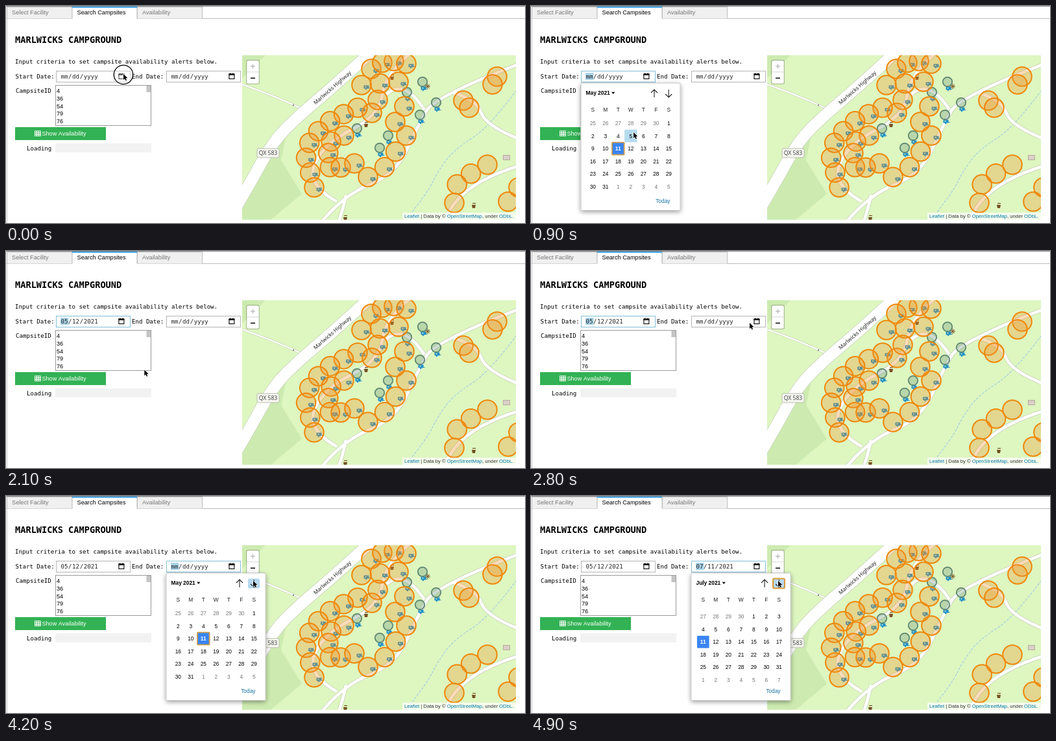
These frames come from a looping animation (800 px wide and 335 px high, 5000 ms). An HTML page with a canvas:

```html
<!DOCTYPE html>
<html lang="en">
<head>
<meta charset="utf-8">
<title>Campsite search</title>
<style>
html, body { margin: 0; width: 100%; height: 100%; overflow: hidden; background: #fff; }
canvas { display: block; width: 800px; height: 335px; }
</style>
</head>
<body>
<canvas id="stage" width="800" height="335"></canvas>
<script>
const ctx = document.getElementById('stage').getContext('2d');
const LOOP = 5000, STEP = 100;
const SANS = '"Liberation Sans", Arial, sans-serif';
const MONO = '"DejaVu Sans Mono", monospace';
const NOTO = '"Noto Sans", sans-serif';
const MONTHS = { 4: 'May', 5: 'June', 6: 'July' };
const GRASS = '#cdebb0', CAMP = '#def6c0';

function rect(x, y, w, h, fill, stroke, lw = 1) {
  if (fill) { ctx.fillStyle = fill; ctx.fillRect(x, y, w, h); }
  if (stroke) {
    ctx.strokeStyle = stroke;
    ctx.lineWidth = lw;
    ctx.strokeRect(x + lw / 2, y + lw / 2, w - lw, h - lw);
  }
}

function paint(fill, stroke, lw = 1) {
  if (fill) { ctx.fillStyle = fill; ctx.fill(); }
  if (stroke) { ctx.strokeStyle = stroke; ctx.lineWidth = lw; ctx.stroke(); }
}

function round(x, y, w, h, r, fill, stroke, lw) {
  ctx.beginPath();
  ctx.roundRect(x, y, w, h, r);
  paint(fill, stroke, lw);
}

function disc(x, y, r, fill, stroke, lw) {
  ctx.beginPath();
  ctx.arc(x, y, r, 0, Math.PI * 2);
  paint(fill, stroke, lw);
}

function poly(pts, fill, stroke, lw) {
  ctx.beginPath();
  pts.forEach(p => ctx.lineTo(...p));
  ctx.closePath();
  paint(fill, stroke, lw);
}

function text(str, x, y, font, color = '#000', align = 'left') {
  ctx.font = font;
  ctx.fillStyle = color;
  ctx.textAlign = align;
  ctx.fillText(str, x, y);
}

// Smooth line through the midpoints of the given points.
function path(pts, color, lw, dash = []) {
  ctx.beginPath();
  ctx.moveTo(...pts[0]);
  for (let i = 1; i < pts.length - 1; i++) {
    const [x, y] = pts[i], [nx, ny] = pts[i + 1];
    const k = i === pts.length - 2 ? 1 : 0.5;
    ctx.quadraticCurveTo(x, y, x + (nx - x) * k, y + (ny - y) * k);
  }
  ctx.setLineDash(dash);
  paint(null, color, lw);
  ctx.setLineDash([]);
}

// n evenly spaced points along a polyline.
function spread(n, ...pts) {
  const lens = pts.slice(1).map((p, i) => Math.hypot(p[0] - pts[i][0], p[1] - pts[i][1]));
  const gap = lens.reduce((a, b) => a + b, 0) / (n - 1);
  return Array.from({ length: n }, (_, k) => {
    let s = gap * k, i = 0;
    while (i < lens.length - 1 && s > lens[i]) s -= lens[i++];
    const u = s / lens[i], [x, y] = pts[i], [nx, ny] = pts[i + 1];
    return [x + (nx - x) * u, y + (ny - y) * u];
  });
}

const campSites = [
  ...spread(4, [563, 97], [588, 83], [617, 89]),
  ...spread(3, [548, 122], [605, 117]),
  ...spread(2, [573, 145], [564, 165]),
  ...spread(8, [542, 157], [503, 175], [470, 203], [462, 232], [475, 280]),
  ...spread(6, [521, 200], [495, 212], [500, 254], [537, 243]),
  ...spread(4, [558, 264], [585, 248], [617, 200]),
  ...spread(2, [600, 179], [614, 155])
];
const eastSites = [
  ...spread(2, [757, 109], [750, 121]),
  ...spread(2, [705, 146], [714, 157]),
  ...spread(4, [742, 245], [696, 270], [691, 304]),
  ...spread(2, [774, 302], [790, 280])
];
const closedSites = [
  [541, 189],
  ...spread(2, [642, 117], [618, 133]),
  ...spread(2, [663, 149], [638, 168]),
  ...spread(2, [589, 200], [576, 219])
];

function drawRoads() {
  const highway = [[340, 335], [374, 278], [412, 208], [455, 166], [503, 126], [562, 72]];
  const lanes = [
    [[484, 336], [520, 292], [600, 260], [635, 185], [660, 140], [790, 90]],
    [[510, 302], [462, 275], [490, 212], [575, 170], [585, 105], [622, 74]],
    [[585, 138], [612, 110], [645, 160]],
    [[512, 336], [520, 312], [524, 292]],
    [[676, 336], [690, 278], [790, 247]],
    [[690, 134], [725, 145], [740, 185], [790, 205]]
  ];
  const spur = [[364, 121], [410, 137], [453, 157]];
  path(spur, '#bfc8b0', 3.4);
  path(spur, '#fff', 2.2);
  path(highway, '#bfc8b0', 19);
  lanes.forEach(l => path(l, '#bfc8b0', 6));
  lanes.forEach(l => path(l, '#fff', 4.8));
  path(highway, '#fff', 17.8);
  disc(443, 153, 1.2, '#888');
}

function drawVan(x, y) {
  const blue = '#1e8fc6';
  round(x - 4.5, y - 3.5, 8, 5, 1, blue);
  rect(x - 2.5, y - 2, 2, 1.5, CAMP);
  rect(x + 3, y, 2.5, 1, blue);
  disc(x - 1, y + 2, 1.2, blue);
}

function drawTap(x, y) {
  rect(x - 2, y - 4, 5, 1.2, '#765024');
  poly([[x - 3, y - 1], [x + 3, y - 1], [x + 2, y + 4], [x - 2, y + 4]], '#765024');
}

function drawSpark(x, y) {
  for (let a = 0; a < Math.PI; a += Math.PI / 4) {
    const dx = 4 * Math.cos(a), dy = 4 * Math.sin(a);
    path([[x - dx, y - dy], [x, y], [x + dx, y + dy]], '#765024', 1);
  }
}

function drawZoom() {
  round(370, 83, 21, 38, 3, 'rgba(0,0,0,.22)');
  round(371.3, 84.3, 18.4, 35.4, 2, '#fff');
  rect(371.3, 101.5, 18.4, 0.8, '#ccc');
  rect(377, 92.4, 7, 1.4, '#bbb');
  rect(379.8, 89.6, 1.4, 7, '#bbb');
  rect(377, 110.6, 7, 1.5, '#000');
}

function drawCredit() {
  rect(611, 319, 175, 11, 'rgba(255,255,255,.7)');
  let x = 614;
  ['Leaflet', ' | Data by © ', 'OpenStreetMap', ', under ', 'ODbL.'].forEach((s, i) => {
    text(s, x, 327.2, '7.7px ' + SANS, i % 2 ? '#333' : '#0078a8');
    x += ctx.measureText(s).width;
  });
}

function drawMap() {
  ctx.save();
  ctx.beginPath();
  ctx.rect(364, 76, 422, 254);
  ctx.clip();
  rect(364, 76, 422, 254, CAMP);
  poly([[364, 76], [400, 76], [364, 112]], GRASS);
  poly([[432, 200], [424, 238], [456, 290], [408, 330], [364, 330], [364, 300]], GRASS);
  path([[787, 130], [744, 188], [690, 222], [664, 258], [650, 288], [615, 332]],
    '#a3cfe0', 1.2, [4, 2]);
  drawRoads();
  rect(766, 230, 11, 8, '#d9d0c9', '#b9ab9c');

  ctx.save();
  ctx.translate(503, 126);
  ctx.rotate(-0.72);
  text('Marlwicks Highway', 0, 3, '8.2px ' + NOTO, '#222', 'center');
  ctx.restore();
  round(387, 220, 34, 14, 2, '#f6f6f1', '#b9bcae');
  text('QX 583', 404, 230.2, '8.6px ' + NOTO, '#444', 'center');

  campSites.forEach(([x, y]) => drawVan(x + 8, y + 4));
  closedSites.forEach(([x, y]) => drawVan(x + 2, y + 11));
  [[555, 183], [595, 110], [721, 308], [523, 327]].forEach(p => drawTap(...p));
  drawSpark(650, 124);
  closedSites.forEach(([x, y]) => disc(x, y, 7.2, 'rgba(95,140,115,.3)', '#5e8770', 1.8));
  [...campSites, ...eastSites]
    .forEach(([x, y]) => disc(x, y, 14.8, 'rgba(240,145,40,.32)', '#ef8708', 2));
  drawZoom();
  drawCredit();
  ctx.restore();
}

function drawDate(left, parts, focus) {
  rect(left, 100, 115, 18, '#fff', focus ? '#7fbfd8' : '#b5b5b5');
  if (focus) rect(left + 7, 103, 12.5, 11, '#a9d5ea');
  let x = left + 7.5;
  parts.split(/(\/)/).forEach(s => {
    text(s, x, 112.3, '9.1px ' + MONO, '#222');
    x += ctx.measureText(s).width + 0.6;
  });
  rect(left + 96.4, 104.6, 9, 8.4, null, '#000', 1.1);
  rect(left + 96.4, 104.6, 9, 2.2, '#000');
  for (const dx of [98, 102.5]) rect(left + dx, 103.4, 1.2, 2, '#000');
}

function drawTabs() {
  rect(0, 0, 800, 1, '#8d8d8d');
  rect(0, 19, 800, 1, '#bdbdbd');
  rect(1, 19, 1, 316, '#c8c8c8');
  ['Select Facility', 'Search Campsites', 'Availability'].forEach((s, i) => {
    const x = 1 + i * 100.5, active = i === 1;
    rect(x, 1, 101, active ? 19 : 18.5, active ? '#fff' : '#f0f0f0');
    for (const dx of [0, 100]) rect(x + dx, 1, 1, 18.5, '#bdbdbd');
    rect(x, 1, 101, active ? 1.6 : 1, active ? '#2196e8' : '#bdbdbd');
    text(s, x + 8, 13.3, '9.2px ' + SANS, active ? '#000' : '#777');
  });
}

function drawForm() {
  const mono = '9.1px ' + MONO, sans = '9.1px ' + SANS;
  text('MARLWICKS CAMPGROUND', 14, 56.5, 'bold 13.65px ' + MONO);
  text('Input criteria to set campsite availability alerts below.', 14, 89, mono);
  text('Start Date:', 14.5, 111.5, mono);
  text('End Date:', 194, 111.5, mono);
  text('CampsiteID', 15, 133.5, mono);
  text('Loading', 32, 222.5, mono);

  rect(76, 122, 148, 63, '#fff', '#9a9a9a');
  [4, 36, 54, 79, 76].forEach((n, i) => text(n, 78, 134.3 + i * 11.65, sans));
  rect(216.5, 123, 6.5, 10, '#c4c4c4');
  rect(14, 187, 140, 20, '#32b254');
  for (let i = 0; i < 9; i++) {
    rect(44 + (i % 3) * 3, 192.5 + Math.floor(i / 3) * 2.6, 3.8, 3.4, null, '#fff', 0.9);
  }
  text('Show Availability', 55.5, 200, sans, '#fff');
  rect(76, 212, 148, 14, '#f2f2f2');
}

function drawArrow(x, y, dir) {
  ctx.beginPath();
  ctx.moveTo(x, y - 6 * dir);
  ctx.lineTo(x, y + 6 * dir);
  ctx.moveTo(x - 5, y + dir);
  ctx.lineTo(x, y + 6 * dir);
  ctx.lineTo(x + 5, y + dir);
  paint(null, '#222', 1.1);
}

// Scroll is measured in weeks from 25 April; button is '', 'hover' or 'focus'.
function drawPicker(left, month, scroll, mouse, button) {
  const font = '8.4px ' + SANS, title = MONTHS[month] + ' 2021';
  ctx.save();
  ctx.shadowColor = 'rgba(0,0,0,.4)';
  ctx.shadowBlur = 7;
  ctx.shadowOffsetY = 2;
  round(left, 119, 154, 197, 2, '#fff');
  ctx.restore();
  round(left + 0.5, 119, 153, 196.5, 2, null, '#bbb', 0.8);

  text(title, left + 8, 137.2, 'bold ' + font);
  const tip = left + 13 + ctx.measureText(title).width;
  poly([[tip - 2.6, 132.8], [tip + 2.6, 132.8], [tip, 136]], '#000');
  if (button) {
    round(left + 126.5, 127.5, 18, 15, 2, '#b5d9ee', button === 'focus' && '#dd9a35', 2);
  }
  drawArrow(left + 113.5, 135, -1);
  drawArrow(left + 135.7, 135, 1);
  const colX = c => left + 18.8 + c * 19.5;
  [...'SMTWTFS'].forEach((d, c) => text(d, colX(c), 163, font, '#222', 'center'));

  ctx.save();
  ctx.beginPath();
  ctx.rect(left, 170, 154, 119);
  ctx.clip();
  for (let r = Math.floor(scroll); r < scroll + 6; r++) {
    const y = 181 + 19.6 * (r - scroll);
    for (let c = 0; c < 7; c++) {
      const x = colX(c), day = new Date(2021, 3, 25 + r * 7 + c);
      const inMonth = day.getMonth() === month;
      const picked = inMonth && day.getDate() === 11;
      const hover = Math.abs(mouse[0] - x) < 9.7 && Math.abs(mouse[1] - y) < 9.8;
      if (picked) {
        round(x - 9.3, y - 9.5, 18.6, 19, 1, '#3a85f3', button !== 'focus' && '#cf9c48', 1.8);
      } else if (hover) {
        rect(x - 9.7, y - 9.7, 19.4, 19.4, '#b5dbee');
      }
      text(day.getDate(), x, y + 3, (picked ? 'bold ' : '') + font,
        picked ? '#fff' : inMonth ? '#000' : '#777', 'center');
    }
  }
  ctx.restore();
  text('Today', left + 138, 303.5, font, '#16739e', 'right');
}

// Pointer moves: start, end, target position.
const MOVES = [
  [300, 900, 158, 195], [900, 1400, 156, 217], [1800, 2600, 337, 111],
  [3000, 3300, 348, 110], [3700, 4200, 381, 131]
];

function mouseAt(t) {
  return MOVES.reduce(([x, y], [from, to, tx, ty]) => {
    const u = Math.min(1, Math.max(0, (t - from) / (to - from)));
    const e = u * u * (3 - 2 * u);
    return [x + (tx - x) * e, y + (ty - y) * e];
  }, [181, 105]);
}

function drawCursor([x, y], pressed) {
  if (pressed) disc(x, y + 1, 14.7, 'rgba(255,255,255,.3)', '#000', 1.3);
  ctx.save();
  ctx.translate(x, y);
  ctx.scale(0.86, 0.86);
  ctx.lineJoin = 'round';
  const shape = [[0, 0], [0, 10.5], [2.4, 8.3], [4, 12], [5.8, 11.2], [4.2, 7.6], [7.4, 7.4]];
  poly(shape, null, '#fff', 1.6);
  poly(shape, '#000');
  ctx.restore();
}

const between = (t, a, b) => t >= a && t < b;
const easeOut = (t, start) => 1 - (1 - Math.min(1, Math.max(0, (t - start) / 350))) ** 3;

function draw(t) {
  const mouse = mouseAt(t);
  const month = t < 4500 ? 4 : t < 4690 ? 5 : 6;
  const blank = 'mm/dd/yyyy';
  const endOpen = t >= 3400;

  rect(0, 0, 800, 335, '#fff');
  drawTabs();
  drawForm();
  drawMap();
  drawDate(77, t < 1900 ? blank : '05/12/2021', between(t, 200, 3400));
  drawDate(247, month > 4 ? `0${month + 1}/11/2021` : blank, endOpen);
  if (between(t, 200, 1900)) drawPicker(76.5, 4, 0, mouse, '');
  if (endOpen) {
    const scroll = 5 * easeOut(t, 4500) + 4 * easeOut(t, 4690);
    drawPicker(246.5, month, scroll, mouse, t >= 4500 ? 'focus' : t >= 4100 ? 'hover' : '');
  }
  const clicks = [[0, 200], [1500, 1800], [3300, 3500], [4500, 4800]];
  drawCursor(mouse, clicks.some(([a, b]) => between(t, a, b)));
}

let shown = -1;
function tick(now) {
  const t = Math.floor((now % LOOP) / STEP) * STEP;
  if (t !== shown) draw(shown = t);
  requestAnimationFrame(tick);
}
draw(0);
requestAnimationFrame(tick);
</script>
</body>
</html>
```
